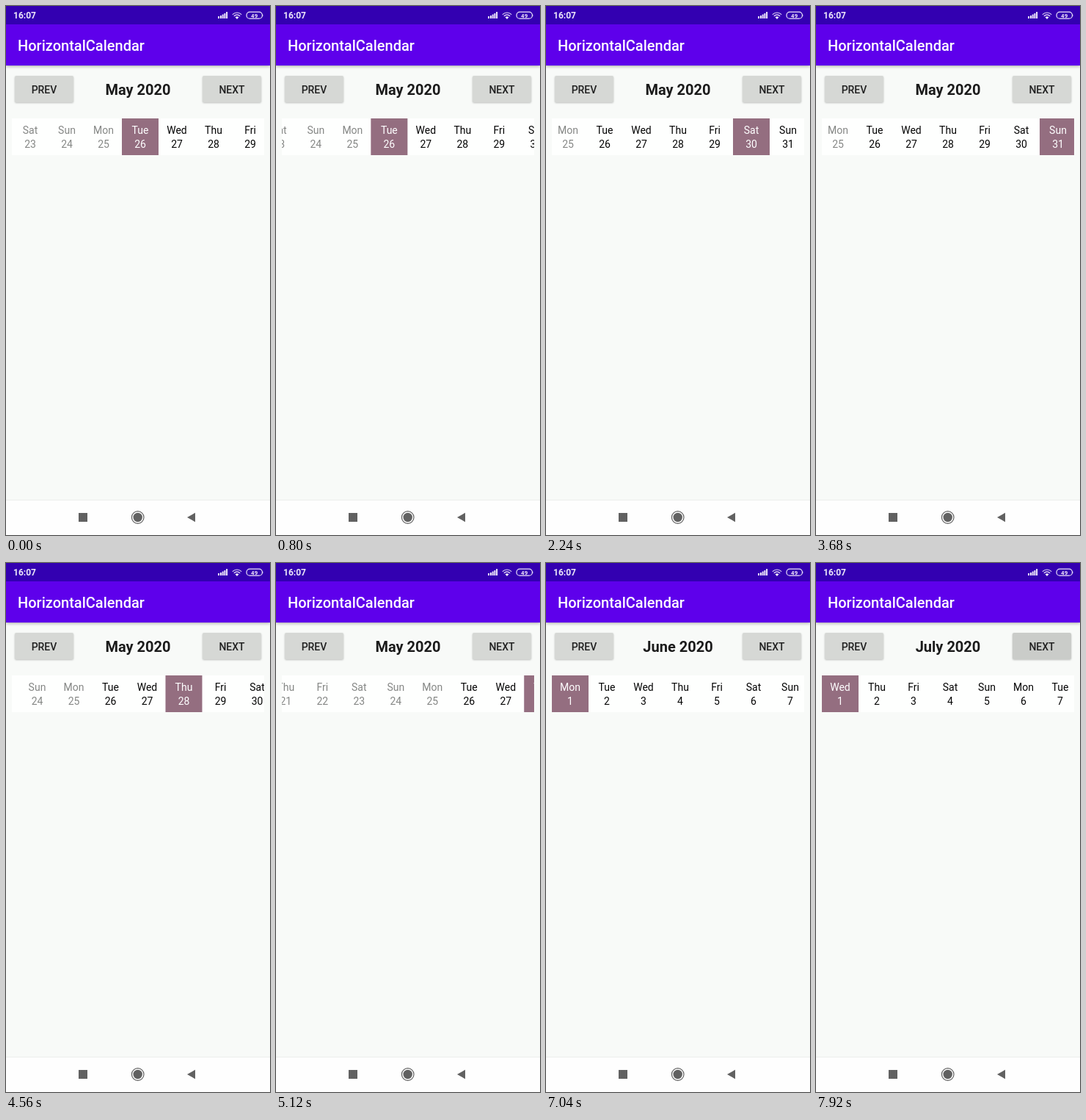
Animation of 360x720 px, one loop 8 s. Source, as an HTML page:

```html
<!DOCTYPE html>
<html lang="en">
<head>
<meta charset="utf-8">
<title>HorizontalCalendar</title>
<style>
  html, body { margin: 0; width: 100%; height: 100%; overflow: hidden; background: #f8faf8; }
  svg { display: block; width: 360px; height: 720px; font: 14px Roboto, sans-serif; }
  .mid { text-anchor: middle; }
  .medium { font-weight: 500; }
  .bar { filter: drop-shadow(0 1px 2px rgba(0, 0, 0, .35)); }
  .button rect { fill: #d6d8d5; filter: drop-shadow(0 1px 1px rgba(0, 0, 0, .24)); }
  .button text { fill: #202020; font-weight: 500; text-anchor: middle; }
  .cell rect { fill: none; }
  .cell text { fill: #050505; text-anchor: middle; }
  .cell.past text { fill: #858785; }
  .cell.selected rect { fill: #946e80; }
  .cell.selected text { fill: #fff; }
</style>
</head>
<body>
<svg viewBox="0 0 360 720">
  <defs><clipPath id="strip"><rect x="8" y="153" width="344" height="50"/></clipPath></defs>
  <rect width="360" height="720" fill="#f8faf8"/>

  <rect class="bar" y="24" width="360" height="57" fill="#5e00eb"/>
  <rect width="360" height="25" fill="#3300b1"/>
  <text x="16" y="61" font-size="20" class="medium" fill="#fff">HorizontalCalendar</text>

  <g fill="#eee9fa">
    <text x="10" y="17" font-size="12" font-weight="600">16:07</text>
    <path d="M289 14h2v3h-2zM292 13h2v4h-2zM294.7 11.5h2v5.5h-2zM297.4 10h2v7h-2zM300.1 8h2v9h-2z"/>
    <g fill="none" stroke="#eee9fa" stroke-width="1.2">
      <path d="M308.8 11.6Q315 6.4 321.2 11.6M310.8 13.7Q315 10.2 319.2 13.7"/>
      <rect x="328" y="8.2" width="21.5" height="9" rx="4.5"/>
    </g>
    <path d="M312.5 15.3Q315 13.2 317.5 15.3L315 18z"/>
    <path d="M350.3 11q1 1.7 0 3.4z"/>
    <text x="338.7" y="15.6" font-size="8" font-weight="600" class="mid">49</text>
  </g>

  <g class="button">
    <rect x="12" y="95" width="80" height="36" rx="2"/>
    <text x="52" y="118.5">PREV</text>
  </g>
  <g class="button">
    <rect x="268" y="95" width="80" height="36" rx="2"/>
    <rect id="press" x="268" y="95" width="80" height="36" rx="2" style="fill:#000;filter:none" opacity="0"/>
    <text x="308" y="118.5">NEXT</text>
  </g>
  <text id="title" x="180" y="121" font-size="20" font-weight="700" class="mid" fill="#1b1b1b"></text>

  <rect x="8" y="153" width="344" height="50" fill="#fefffe"/>
  <g clip-path="url(#strip)"><g id="days"></g></g>

  <rect y="672" width="360" height="48" fill="#fefefe"/>
  <rect y="672" width="360" height="1" fill="#eceeec"/>
  <g fill="#616161">
    <rect x="99" y="690" width="12" height="12"/>
    <circle cx="179.7" cy="696" r="6.2"/>
    <circle cx="179.7" cy="696" r="8.3" fill="none" stroke="#616161" stroke-width="1.2"/>
    <path d="M247 696L258 689.8V702.2z"/>
  </g>
</svg>
<script>
const LOOP = 8000, CELL = 50, TODAY = 26;
const NAMES = ['Sun', 'Mon', 'Tue', 'Wed', 'Thu', 'Fri', 'Sat'];
// weekday: index of the first day of the month
const MONTHS = [
  { title: 'May 2020', weekday: 5, length: 31, today: TODAY },
  { title: 'June 2020', weekday: 1, length: 30, today: 0 },
  { title: 'July 2020', weekday: 3, length: 31, today: 0 }
];
// [start time, value]
const PAGES = [[0, 0], [6560, 1], [7520, 2]];
const TAPS = [[0, 26], [2240, 30], [2720, 31], [3760, 28], [6560, 1]];
const PRESSES = [[6380, 6560], [7300, 7520], [7740, 8000]];

const linear = u => u;
const easeOut = u => 1 - (1 - u) ** 2;
// left edge of today's cell: [time, x, easing towards this point]
const SCROLL = [
  [400, 158, linear], [1280, 95, linear], [1900, 55, easeOut],
  [4260, 55, linear], [4560, 117.5, linear], [5420, 255, easeOut]
];

const byId = id => document.getElementById(id);
const days = byId('days'), title = byId('title'), press = byId('press');

function buildMonth(month) {
  const group = document.createElementNS('http://www.w3.org/2000/svg', 'g');
  group.innerHTML = Array.from({ length: month.length }, (_, i) => {
    const name = NAMES[(month.weekday + i) % 7];
    return `<g class="cell" transform="translate(${i * CELL} 153)">
      <rect width="50" height="50"/>
      <text x="25" y="21">${name}</text><text x="25" y="40">${i + 1}</text></g>`;
  }).join('');
  days.append(group);
  return group;
}
const groups = MONTHS.map(buildMonth);

const stepAt = (steps, t) => steps.filter(([start]) => start <= t).pop()[1];

function scrollAt(t) {
  const next = SCROLL.findIndex(([time]) => time > t);
  if (next === 0) return SCROLL[0][1];
  if (next < 0) return SCROLL[SCROLL.length - 1][1];
  const [t0, x0] = SCROLL[next - 1], [t1, x1, ease] = SCROLL[next];
  return x0 + (x1 - x0) * ease((t - t0) / (t1 - t0));
}

function pressAt(t) {
  const level = ([down, up]) =>
    Math.max(0, Math.min(1, (t - down) / 120, 1 - (t - up) / 180));
  return 0.055 * Math.max(...PRESSES.map(level));
}

let shown = '';
function showState(page, selected) {
  const key = page + '/' + selected;
  if (key === shown) return;
  shown = key;
  title.textContent = MONTHS[page].title;
  groups.forEach((group, i) => { group.style.display = i === page ? '' : 'none'; });
  [...groups[page].children].forEach((cell, i) => {
    cell.classList.toggle('past', i + 1 < MONTHS[page].today);
    cell.classList.toggle('selected', i + 1 === selected);
  });
}

function draw(now) {
  const t = now % LOOP;
  const page = stepAt(PAGES, t);
  showState(page, stepAt(TAPS, t));
  const left = page === 0 ? scrollAt(t) - (TODAY - 1) * CELL : 8;
  days.setAttribute('transform', `translate(${left.toFixed(2)} 0)`);
  press.setAttribute('opacity', pressAt(t));
}

let origin;
function frame(now) {
  origin ??= now;
  draw(now - origin);
  requestAnimationFrame(frame);
}
draw(0);
requestAnimationFrame(frame);
</script>
</body>
</html>
```
